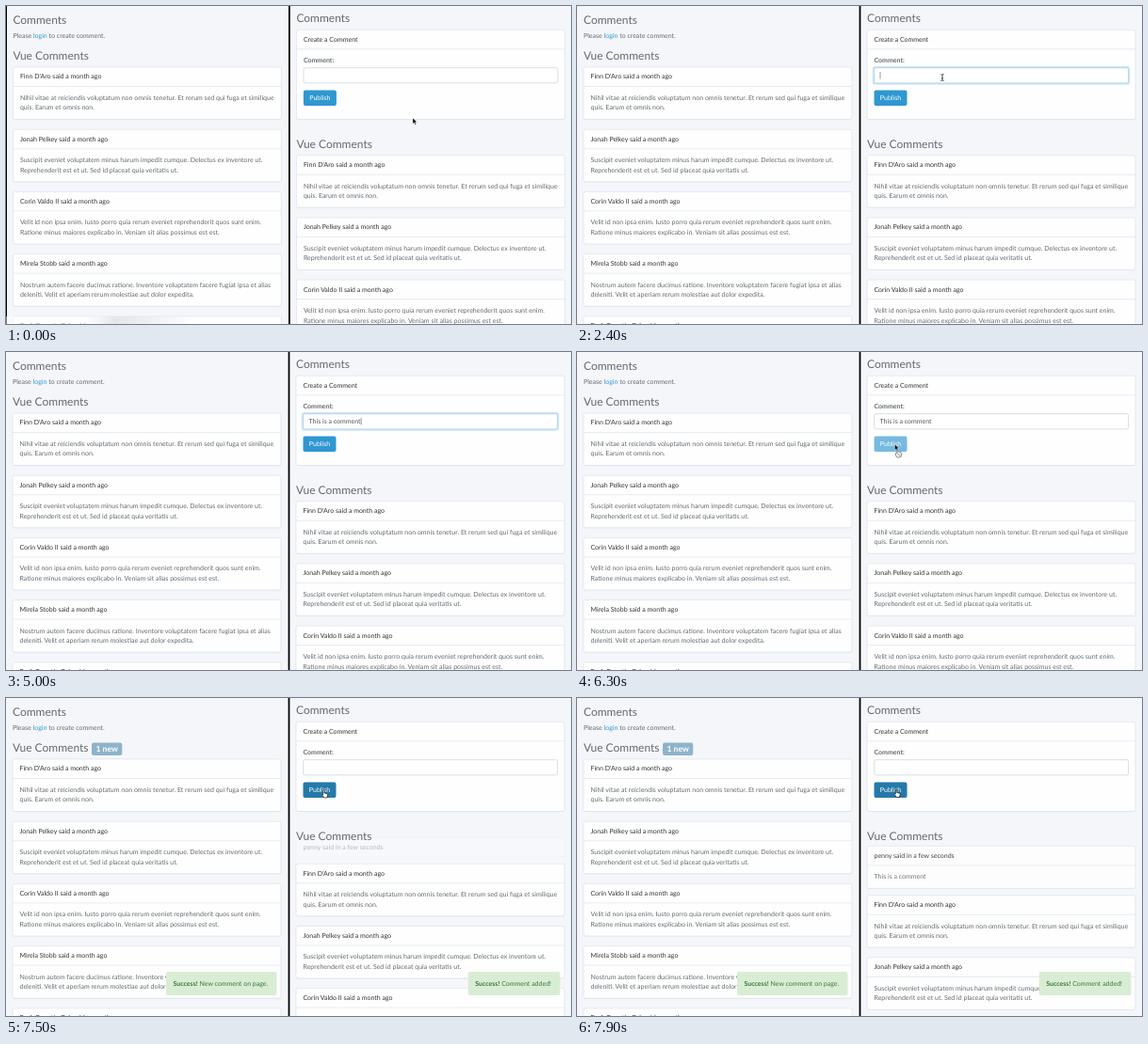
These frames come from a looping animation (600x338 px, 8 s). An HTML page:

```html
<!DOCTYPE html>
<html lang="en">
<head>
<meta charset="utf-8">
<title>Live comments</title>
<style>
  html, body { margin: 0; width: 100%; height: 100%; overflow: hidden; background: #f5f6fa; }
  svg { display: block; width: 600px; height: 338px; }
  text { font: 7px Lato, "Open Sans", sans-serif; fill: #636b6f; text-rendering: geometricPrecision; white-space: pre; }
  .title { font-size: 12px; }
  .head { fill: #333; }
  .bold { font-weight: 700; }
  .panel { fill: #fefefe; stroke: #d6e0e9; stroke-width: .6; }
  .good { fill: #3c763d; }
</style>
</head>
<body>
<svg id="stage" viewBox="0 0 600 338"></svg>
<script>
const LOOP = 8000, ROW = 66.2, NEW_ROW = 56;
const MESSAGE = "This is a comment";
const KEYS = [3000, 3100, 3200, 3400, 3500, 3700, 3800, 4000, 4100, 4300, 4400, 4600, 4700, 4700, 4800, 4900, 5000];

const comments = [
  ["Finn D'Aro", "Nihil vitae at reiciendis voluptatum non omnis tenetur. Et rerum sed qui fuga et similique", "quis. Earum et omnis non."],
  ["Jonah Pelkey", "Suscipit eveniet voluptatem minus harum impedit cumque. Delectus ex inventore ut.", "Reprehenderit est et ut. Sed id placeat quia veritatis ut."],
  ["Corin Valdo II", "Velit id non ipsa enim. Iusto porro quia rerum eveniet reprehenderit quos sunt enim.", "Ratione minus maiores explicabo in. Veniam sit alias possimus est est."],
  ["Mirela Stobb", "Nostrum autem facere ducimus ratione. Inventore voluptatem facere fugiat ipsa et alias", "deleniti. Velit et aperiam rerum molestiae aut dolor expedita."],
  ["Prof. Quentin Osk", "", ""]
];

// Cursor path: time, x, y, shape
const track = [
  [0, 432, 119, "arrow"], [100, 432, 119, "arrow"], [600, 211, 32, "arrow"], [700, 388, 92, "arrow"],
  [900, 388, 92, "arrow"], [1300, 35, 30, "arrow"], [1900, 35, 30, "arrow"], [2300, 388, 76, "beam"],
  [3000, 388, 76, "none"], [5500, 388, 76, "beam"], [5600, 380, 80, "arrow"], [5900, 340, 97, "hand"],
  [6100, 337.5, 98, "hand"], [6300, 337.5, 98, "blocked"], [7000, 337.5, 98, "hand"],
  [7500, 337.5, 98, "hand"], [7900, 339, 97.5, "hand"], [LOOP, 339, 97.5, "hand"]
];

const text = (x, y, str, cls = "") => `<text x="${x}" y="${y}" class="${cls}">${str}</text>`;
const box = (x, y, w, h, attrs = 'class="panel"') =>
  `<rect x="${x}" y="${y}" width="${w}" height="${h}" rx="2" ${attrs}/>`;

function panel(x, y, h, title) {
  return box(x, y + .7, 285, h, 'fill="#d3e0e9" opacity=".5"') + box(x, y, 285, h) +
    `<path d="M${x} ${y + 20.5}h285" class="panel"/>` + text(x + 7.5, y + 12.4, title, "head");
}

function card(x, y, [name, ...lines], when = "a month ago") {
  return panel(x, y, lines.length > 1 ? 55.5 : 45, `${name} said ${when}`) +
    lines.map((line, i) => text(x + 7.5, y + 35 + i * 10.4, line)).join("");
}

const list = (x, y) => comments.map((c, i) => card(x, y + i * ROW, c)).join("");

const toast = (id, x, w, str) => `<g id="${id}">` + box(x, 291, w, 25, 'fill="#d9edd5"') +
  text(x + 7.5, 306, `<tspan class="bold">Success!</tspan> ${str}`, "good") + "</g>";

const arrow = '<path d="M0 0V6.2L1.5 4.9L2.5 7.2L3.5 6.8L2.5 4.5H4.4Z" fill="#000" stroke="#fff" stroke-width=".4"/>';
const cursors = {
  arrow,
  beam: '<path d="M-1.6 -3.5Q0 -3.5 0 -2.5Q0 -3.5 1.6 -3.5M0 -2.5V2.5M-1.6 3.5Q0 3.5 0 2.5Q0 3.5 1.6 3.5M-.8 .8H.8" fill="none" stroke="#222" stroke-width=".8"/>',
  hand: '<path d="M-.7 4.5V.2Q0 -.8 .7 .2V3L3.8 3.8Q4.4 4 4.2 5L3.4 8H.4L-2 4.8Q-1.8 3.8 -.7 4.5Z" fill="#fff" stroke="#111" stroke-width=".7"/>',
  blocked: arrow + '<g transform="translate(4 11)" stroke="#8d8d8d" stroke-width="1"><circle r="3.2" fill="#f4f4f4"/><path d="M-2.2 -2.2L2.2 2.2"/></g>',
  none: ""
};

const stage = document.getElementById("stage");
stage.innerHTML = `
  <defs><linearGradient id="fade">
    <stop offset=".4" stop-color="#fff" stop-opacity=".5"/>
    <stop offset=".58" stop-color="#e4e6e8"/>
    <stop offset="1" stop-color="#e4e6e8" stop-opacity="0"/>
  </linearGradient></defs>
  <rect width="600" height="338" fill="#f5f6fa"/>
  <g id="page">
    ${text(7, 19.2, "Comments", "title")}
    ${text(7, 34.3, 'Please <tspan fill="#3097d1">login</tspan> to create comment.')}
    ${text(7, 57.4, "Vue Comments", "title")}
    <g id="badge">${box(91, 47.4, 32.3, 13.6, 'fill="#8eb4cb"')}
      <text x="107.2" y="57.3" text-anchor="middle" class="bold" style="fill:#fff;font-size:8.6px">1 new</text></g>
    ${list(7, 65)}
    ${toast("toastLeft", 170, 117.5, "New comment on page.")}
    <rect x="299.6" width="1.8" height="338"/>
    ${text(308, 17, "Comments", "title")}
    ${panel(308, 25.3, 95.2, "Create a Comment")}
    ${text(315.5, 60.2, "Comment:", "bold")}
    <g id="glow">${box(314.7, 64.9, 271.6, 17.8, 'fill="none" stroke="#98cbe8" stroke-width="2" opacity=".45"')}</g>
    ${box(315.6, 65.7, 270, 16.2, 'id="field" fill="#fff" stroke-width=".7"')}
    <text id="typed" x="321.5" y="76.2" style="fill:#555"></text>
    <rect id="caret" y="70" width=".6" height="7.5" fill="#333"/>
    <g id="button">${box(315.5, 89.5, 35, 16.6, 'id="face"')}
      <text x="333" y="100.2" text-anchor="middle" style="fill:#fff">Publish</text></g>
    <g id="added">${card(308, 158.7, ["penny", MESSAGE], "in a few seconds")}</g>
    ${text(308, 151.3, "Vue Comments", "title")}
    <g id="feed">${list(308, 158.7)}</g>
    ${toast("toastRight", 490.7, 97.7, "Comment added!")}
  </g>
  <g id="edges"><rect width="1" height="338"/><rect y="330" width="200" height="8" fill="url(#fade)"/></g>
  <g id="cursor"></g>`;

const el = id => document.getElementById(id);
const set = (id, attrs) => { for (const k in attrs) el(id).setAttribute(k, attrs[k]); };
const clamp = v => Math.min(1, Math.max(0, v));
const ramp = (t, from, to) => clamp((t - from) / (to - from));

function cursorAt(t) {
  const i = track.findLastIndex(p => p[0] <= t);
  const a = track[i], b = track[i + 1];
  const k = ramp(t, a[0], b[0]), s = k * k * (3 - 2 * k);
  return { x: a[1] + (b[1] - a[1]) * s, y: a[2] + (b[2] - a[2]) * s, shape: a[3] };
}

function draw(t) {
  const cursor = cursorAt(t);
  set("cursor", { transform: `translate(${cursor.x} ${cursor.y})` });
  el("cursor").innerHTML = cursors[cursor.shape];

  const settle = 1 - ramp(t, 0, 300);
  set("page", { transform: `translate(${.4 * settle} 0)` });
  set("edges", { opacity: settle });

  const focused = t >= 2400 && t < 6200;
  set("glow", { opacity: focused ? 1 : 0 });
  set("field", { stroke: focused ? "#98cbe8" : "#ccd0d2" });
  el("typed").textContent = t < 7000 ? MESSAGE.slice(0, KEYS.filter(k => k <= t).length) : "";
  const blinkOff = (t >= 2700 && t < 2800) || (t >= 5400 && t < 5900);
  set("caret", { x: 321.7 + el("typed").getComputedTextLength(), opacity: focused && !blinkOff ? .8 : 0 });

  const busy = t >= 6300 && t < 7000;
  set("button", { opacity: busy ? .65 : 1 });
  set("face", { fill: t >= 5900 && !busy ? "#2579a9" : "#3097d1" });

  const grow = ramp(t, 7290, 7960), shift = NEW_ROW * grow;
  set("feed", { transform: `translate(0 ${shift})` });
  set("added", { transform: `translate(0 ${-.27 * (NEW_ROW - shift)})`, opacity: grow });
  set("toastRight", { opacity: ramp(t, 6900, 7300) });
  set("toastLeft", { opacity: ramp(t, 7000, 7400) });
  set("badge", { opacity: t >= 7100 ? 1 : 0 });
}

const start = performance.now();
function frame() {
  draw(Math.floor((performance.now() - start) % LOOP / 100) * 100);
  requestAnimationFrame(frame);
}
frame();
</script>
</body>
</html>
```
